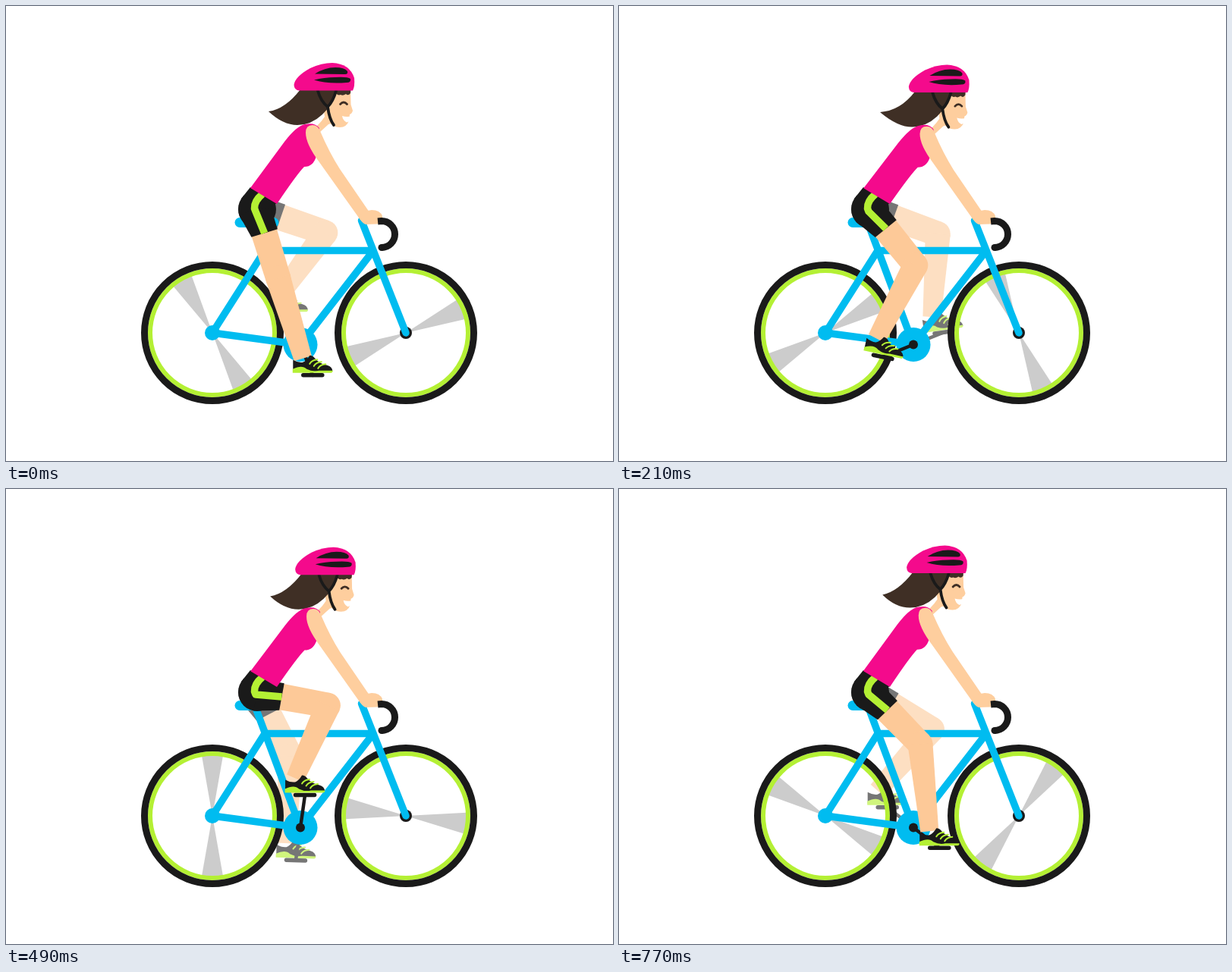
Recreate the animation shown at these times as an HTML page with a canvas. Size 800 by 600 pixels, loop 0.84 s.

```html
<!DOCTYPE html>
<html lang="en">
<head>
<meta charset="utf-8">
<title>Cyclist</title>
<style>
  html, body { margin: 0; width: 100%; height: 100%; overflow: hidden; background: #fff; }
  canvas { display: block; }
</style>
</head>
<body>
<canvas id="stage" width="800" height="600"></canvas>
<script>
const ctx = document.getElementById('stage').getContext('2d');
const STEP = 70, STEPS = 12, RAD = Math.PI / 180;

const BLUE = '#00bcf0', PINK = '#f40a8c', HAIR = '#3f2f25', SKIN = '#fece9e';
const BLACK = '#1a1a1a', GREEN = '#b4f034';
const NEAR = { skin: '#fdc998', dark: BLACK, green: GREEN };
const FAR = { skin: '#fddfc2', dark: '#767676', green: '#d0f57d' };

const HIP = { x: 331, y: 268 }, AXLE = { x: 388, y: 446.5 };
const THIGH = 95, CRANK = 43.5;
// Thigh direction and foot tilt in degrees, one per pedal step.
const thighAngle = [73, 62.5, 57, 51, 41, 31, 19, 10.5, 11.5, 20, 33, 46];
const footTilt = [0, 2, 7, 12, 7, 0, 0, 0, -3, -8, -5, 0];

const shoe = {
  upper: new Path2D('M-26-20Q-19-16-13-17Q-8-19-4-26Q0-26 3-22Q9-15 19-13Q26-11 26-5L-26-5Z'),
  sole: new Path2D('M-26.5-8Q-14-14-8-8Q0-4 8-6L26.5-6Q26-3 24-3L-26.5-3Z'),
  lace: new Path2D('M-4-15Q-1-20 6-20.500')
};
const torso = new Path2D('M322 240L367 179Q383 158 394 156Q407 153 413 161L409 198Q405 212 393 212Q384 221 357 261Z');
const head = {
  neck: new Path2D('M418 130L437 152L425 156L414 166L400 166Q412 158 420 146Z'),
  face: new Path2D('M420 108L454 108L454.500 130L457 138Q456 142 453 143L452 151Q449 160 440 160Q428 160 421 146Z'),
  mouth: new Path2D('M443 145Q449 147 457 145L457 150L449 153.500Q444 151 443 145Z'),
  fringe: new Path2D('M432 109L454.500 109L454 115Q451 119 448 116Q444 119 441 117Q436 119 433 112Z'),
  eye: new Path2D('M440.500 129.500Q445 124.500 449.500 129.500'),
  straps: new Path2D('M411 112Q415 126 424 133Q431 126 435 112M424 133Q426 149 432 157'),
  helmet: new Path2D('M386 111.500Q380 111 379.500 104Q381 93 401 82Q416 75 430 75Q453 76 459 95Q460 106 457 111.500Z'),
  vents: new Path2D('M407 89.500Q420 81 434 81Q446 81 450 86Q451 90 447 90ZM406 97.500Q419 94 434 94Q450 93 454 96Q455 101 449 101Q423 103 406 97.500Z')
};

const along = (p, angle, length) =>
  ({ x: p.x + Math.cos(angle) * length, y: p.y + Math.sin(angle) * length });

function fill(path, color) {
  ctx.fillStyle = color;
  ctx.fill(path);
}

function stroke(path, color, width, cap = 'round') {
  ctx.strokeStyle = color;
  ctx.lineWidth = width;
  ctx.lineCap = cap;
  ctx.lineJoin = 'round';
  ctx.stroke(path);
}

function line(x1, y1, x2, y2, color, width) {
  stroke(new Path2D(`M${x1} ${y1}L${x2} ${y2}`), color, width);
}

function disc(x, y, r, color) {
  ctx.beginPath();
  ctx.arc(x, y, r, 0, Math.PI * 2);
  ctx.fillStyle = color;
  ctx.fill();
}

function ring(x, y, r, width, color) {
  ctx.beginPath();
  ctx.arc(x, y, r, 0, Math.PI * 2);
  ctx.strokeStyle = color;
  ctx.lineWidth = width;
  ctx.stroke();
}

function polygon(points, color) {
  ctx.beginPath();
  for (const p of points) ctx.lineTo(p.x, p.y);
  ctx.closePath();
  ctx.fillStyle = color;
  ctx.fill();
}

// Tapered strip; front and back are half widths at its two ends.
function strip(a, b, front, back, color) {
  const angle = Math.atan2(b.y - a.y, b.x - a.x), up = angle - Math.PI / 2, down = angle + Math.PI / 2;
  polygon([along(a, up, front[0]), along(b, up, front[1]), along(b, down, back[1]), along(a, down, back[0])], color);
}

function wheel(x, y, degrees) {
  for (const turn of [0, 180]) {
    ctx.beginPath();
    ctx.moveTo(x, y);
    ctx.arc(x, y, 80, (degrees + turn - 10) * RAD, (degrees + turn + 10) * RAD);
    ctx.fillStyle = '#cccccc';
    ctx.fill();
  }
  ring(x, y, 82, 6, GREEN);
  ring(x, y, 89.500, 9, BLACK);
}

function legPose(step) {
  const k = step % STEPS, tilt = footTilt[k] * RAD, thigh = thighAngle[k] * RAD;
  const pedal = along(AXLE, (68 + 30 * k) * RAD, CRANK);
  const c = Math.cos(tilt), s = Math.sin(tilt);
  return {
    tilt, thigh, pedal,
    knee: along(HIP, thigh, THIGH),
    ankle: { x: pedal.x - 13 * c + 22 * s, y: pedal.y - 13 * s - 22 * c }
  };
}

function drawCrank({ pedal, tilt }, color) {
  line(AXLE.x, AXLE.y, pedal.x, pedal.y, color, 4.500);
  const a = along(pedal, tilt, -12.500), b = along(pedal, tilt, 12.500);
  line(a.x, a.y, b.x, b.y, color, 5.500);
}

function drawShoe({ pedal, tilt }, colors) {
  ctx.save();
  ctx.translate(pedal.x, pedal.y);
  ctx.rotate(tilt);
  fill(shoe.upper, colors.dark);
  fill(shoe.sole, colors.green);
  for (let i = 0; i < 3; i++) {
    stroke(shoe.lace, colors.green, 2);
    ctx.translate(5.500, 3);
  }
  ctx.restore();
}

function drawShorts(angle, colors) {
  const hem = along(HIP, angle, 33);
  disc(HIP.x, HIP.y, 25, colors.dark);
  strip(HIP, hem, [18, 18], [25, 18], colors.dark);
  return hem;
}

function drawLeg(pose, colors) {
  strip(HIP, pose.knee, [17.500, 16.500], [18, 16.500], colors.skin);
  disc(pose.knee.x, pose.knee.y, 16.500, colors.skin);
  strip(pose.knee, pose.ankle, [16.500, 12], [16.500, 12], colors.skin);
  drawShoe(pose, colors);
  return drawShorts(pose.thigh, colors);
}

function drawFrame() {
  line(308, 285.500, 353, 285.500, BLUE, 13);
  line(328, 286, AXLE.x, AXLE.y, BLUE, 9.500);
  line(341, 322.500, 482, 322.500, BLUE, 9.500);
  line(341, 322.500, 272, 431, BLUE, 9.500);
  line(272, 431, AXLE.x, AXLE.y, BLUE, 9.500);
  line(483, 324, AXLE.x, AXLE.y, BLUE, 9.500);
  disc(272, 431, 10, BLUE);
  disc(527, 431, 8, BLACK);
  line(468.500, 283, 527, 431, BLUE, 9.500);
  disc(AXLE.x, AXLE.y, 22.500, BLUE);
}

// Leans everything above baseY by up to a few pixels.
function lean(baseY, amount, draw) {
  ctx.save();
  ctx.transform(1, 0, -amount, 1 - amount, amount * baseY, amount * baseY);
  draw();
  ctx.restore();
}

function drawHead(k, bob) {
  const sway = Math.cos((k - 2.600) * 30 * RAD), lift = Math.cos((k - 6.500) * 30 * RAD);
  const tipX = 346.500 - 2.500 * sway - bob * 0.9, tipY = 140.300 + 1.300 * lift - bob;
  ctx.save();
  ctx.translate(bob * 0.9, bob);
  fill(head.neck, SKIN);
  fill(head.face, SKIN);
  fill(head.mouth, '#fff');
  fill(new Path2D(`M388 110Q368 136 ${tipX} ${tipY}Q365 157 384 157Q402 157 417 143Q429 132 436 110Z`), HAIR);
  fill(head.fringe, HAIR);
  stroke(head.eye, HAIR, 2.800);
  stroke(head.straps, BLACK, 3.800);
  fill(head.helmet, PINK);
  fill(head.vents, BLACK);
  ctx.restore();
}

function drawArm() {
  fill(new Path2D('M395 167Q395 157 404 157Q411 157 414 165Q426 193 440 215L479 272L467 282L413 206Q395 182 395 167Z'), SKIN);
}

function drawHand() {
  fill(new Path2D('M465 279Q469 270 482 269Q493 269 496 277Q497 281 493 286L489 287.500L474 288Q470 287 465 279Z'), SKIN);
  stroke(new Path2D('M490 284L495 283.500A17.500 17.500 0 0 1 495 318.500'), BLACK, 9, 'butt');
  disc(495, 318.500, 4.500, BLACK);
}

function render(k) {
  const near = legPose(k), far = legPose(k + 6);
  const bob = 1.850 * (1 - Math.cos((k - 10.500) * 30 * RAD)) - 0.540;

  ctx.fillStyle = '#fff';
  ctx.fillRect(0, 0, 800, 600);

  drawLeg(far, FAR);
  drawCrank(far, FAR.dark);
  wheel(272, 431, 60 + 30 * k);
  wheel(527, 431, 337 + 30 * k);
  drawFrame();
  disc(AXLE.x, AXLE.y, 6, BLACK);
  drawCrank(near, NEAR.dark);

  const hem = drawLeg(near, NEAR);
  fill(new Path2D('M322 239L357 260L347 266L331 268L310 254Z'), BLACK);
  stroke(new Path2D(`M338 248Q327 257 327.500 267L329 271L${hem.x} ${hem.y}`), GREEN, 9.500, 'butt');

  drawHead(k, bob);
  lean(260, bob * 0.006, () => fill(torso, PINK));
  lean(282, bob * 0.005, drawArm);
  drawHand();
}

function tick() {
  render(Math.floor(performance.now() / STEP) % STEPS);
  requestAnimationFrame(tick);
}
tick();
</script>
</body>
</html>
```
